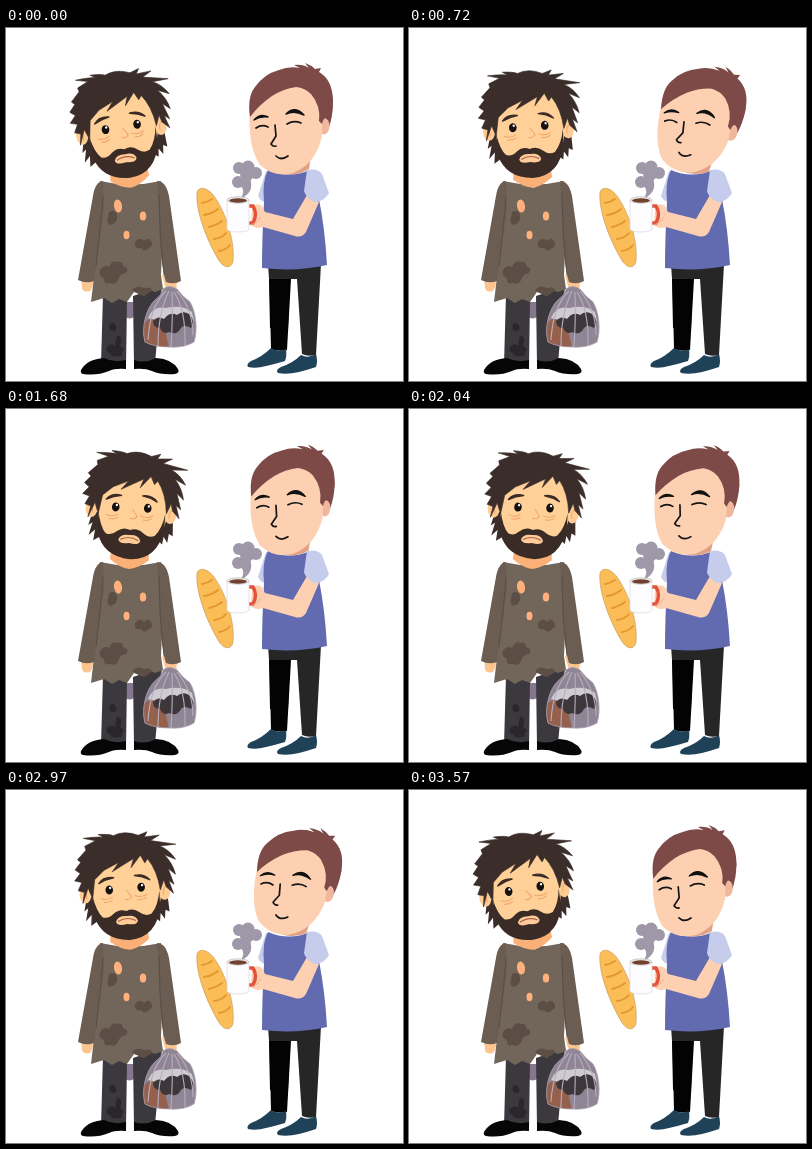
An HTML page that plays this animation: 397x353 px, repeating every 3.6 s.

```html
<!DOCTYPE html>
<html lang="en">
<head>
<meta charset="utf-8">
<title>Sharing breakfast</title>
<style>
html, body { margin: 0; width: 100%; height: 100%; overflow: hidden; background: #fff; }
svg { display: block; width: 397px; height: 353px; }
</style>
</head>
<body>
<svg viewBox="0 0 397 353" xmlns="http://www.w3.org/2000/svg">
  <defs>
    <path id="bagShape" d="M157 261Q163 256 171 261Q176 268 184 274C190 284 192 302 188 314Q178 320 164 319Q148 319 139 314C135 300 140 280 149 272Q156 267 157 261Z"/>
    <clipPath id="bagClip"><use href="#bagShape"/></clipPath>
  </defs>

  <!-- Ragged man: legs and shoes -->
  <path d="M119 274h10v14q-6 5-10 0z" fill="#85788e"/>
  <path d="M97 266L121 272L120 338Q109 340 95 336ZM127 268L156 258L149 335Q139 339 128 337Z" fill="#3b393d"/>
  <path d="M104 296q4-3 6 2t-3 5q-5-1-3-7M111 308q5-1 4 6t-6 2zM101 319q5-5 8-1q5-4 6 1q5 2 1 5q1 5-4 4q-7 2-8-3q-5-1-3-6" fill="#29272b"/>
  <path d="M75 342Q81 331 98 330Q108 335 120 332V341Q109 340 103 343Q91 348 77 346Q74 345 75 342ZM128 332Q139 336 150 330Q166 331 172 341Q174 345 169 346Q155 347 146 343Q139 340 128 341Z" fill="#060606"/>

  <!-- Hands and tunic -->
  <path d="M75 249h12q1 9-3 14q-7 2-8-3zM156 247h13q3 9 1 15q-8 2-11-4z" fill="#fcc58f"/>
  <path d="M94 153Q124 160 155 153L158 182L155 247L157 261L149 264L144 262L138 268L128 264L121 274L113 271L106 275L98 270L85 274L89 240L91 182Z" fill="#72665b"/>
  <path d="M97 153Q89 154 87 168L72 252Q80 256 88 253L98 181ZM151 153Q160 153 163 168L175 253Q168 257 160 254Q154 235 153 186Z" fill="#6b5d52"/>
  <path d="M97 168Q95 195 90 238M153 166Q153 207 158 247" fill="none" stroke="#594b42" stroke-width=".9"/>
  <path d="M103 184q7-3 8 4t-7 9q-4-3-2-7zM129 214q5-6 9-1q4-5 7 0q3 5-2 7q-5 5-8 0q-7 2-6-6M94 242q4-6 9-3q3-8 9-5q5-1 5 4q7 2 3 7q-6 1-7 5q-3 8-9 5q-7 2-6-5q-6-2-4-8M126 262q5-6 12-2q8-2 8 3l-8 5l-9-4z" fill="#5d4e45"/>
  <g fill="#ffb07c">
    <ellipse cx="112" cy="178" rx="4" ry="6.5" transform="rotate(-8 112 178)"/>
    <ellipse cx="137" cy="188" rx="3.2" ry="4.6"/>
    <ellipse cx="120.5" cy="207" rx="3" ry="4.2"/>
  </g>

  <!-- Bag -->
  <use href="#bagShape" fill="#8f8594"/>
  <g clip-path="url(#bagClip)">
    <path d="M137 296q9-9 20-3l6 27h-29z" fill="#95604c"/>
    <path d="M142 290Q147 277 160 280Q176 276 186 284L188 293Q170 288 158 294Z" fill="#cfcbd3"/>
    <path d="M147 293q5-6 11-2q6-8 13-4q6-5 12-1q7 7 2 14q-7-4-10 0q-4 8-12 4q-6 3-9-4q-7 0-7-7" fill="#3d373c"/>
    <path d="M160 263Q144 278 142 312M163 263Q152 285 152 318M166 264Q167 288 165 319M168 264Q180 282 179 317M171 263Q187 282 187 307" fill="none" stroke="#b8aebf" stroke-width="1.1"/>
  </g>
  <use href="#bagShape" fill="none" stroke="#a99fb0" stroke-width=".8"/>

  <!-- Baguette -->
  <path d="M191 164C194 157 203 161 208 168C221 186 229 215 227 233C226 240 219 241 214 234C203 217 189 184 191 164Z" fill="#fabd58" stroke="#c09355" stroke-width=".6"/>
  <path d="M196 175q6-1 10-4M198 187q8-1 14-6M203 199q8-2 13-6M208 211q8-1 12-6M213 223q7-1 11-6" fill="none" stroke="#e5972f" stroke-width="1.9" stroke-linecap="round"/>

  <!-- Young man: legs and shoes -->
  <path d="M263 236H292L285 251L281 322Q273 324 265 321Z" fill="#030303"/>
  <path d="M262 236H315L310 327Q302 329 296 326L291 251H263Z" fill="#262626"/>
  <path d="M263 251H284V252L282 300H264Z" fill="#030303"/>
  <path d="M265 320Q273 325 280 321Q281 328 279 333Q269 336 260 338Q250 341 242 339Q240 336 245 333Q256 329 265 320ZM295 327Q302 331 310 326Q312 333 310 339Q301 342 293 344Q281 347 272 345Q269 342 275 339Q287 335 295 327Z" fill="#1f4259"/>

  <!-- Shirt -->
  <path d="M260 143L252 168Q255 174 260 174L266 145Z" fill="#c6cdec"/>
  <path d="M262 142Q283 151 304 142Q310 150 313 171Q319 201 321 237Q290 244 256 240Q256 211 258 174Q256 153 262 142Z" fill="#626bb0"/>

  <!-- Steam, mug and arm -->
  <g fill="#9f98a8">
    <circle cx="233" cy="140" r="6"/>
    <circle cx="242" cy="139" r="6.500"/>
    <circle cx="250" cy="145" r="6"/>
    <circle cx="241" cy="146" r="7"/>
    <circle cx="232" cy="154" r="6"/>
    <circle cx="239" cy="154" r="6"/>
    <path d="M239 155h6Q247 165 234 171Q240 164 235 158Z"/>
  </g>
  <path d="M246 179Q251 174 256 178L259 184L287 191L301 167L313 174L300 204Q296 210 289 208L257 199Q250 202 245 197Z" fill="#fdd0b2"/>
  <path d="M243 178h4q5 8 0 17h-4" fill="none" stroke="#e5503a" stroke-width="3.400"/>
  <path d="M245 197Q252 195 255 189" fill="none" stroke="#eaa98c" stroke-width=".9"/>
  <path d="M221 172V201Q222 204 232 204T243 201V172Z" fill="#fdfdff" stroke="#d7d6df" stroke-width=".7"/>
  <ellipse cx="232" cy="172" rx="11" ry="3.200" fill="#f0eeee" stroke="#b8adb0" stroke-width=".6"/>
  <ellipse cx="232" cy="172.500" rx="9" ry="2.200" fill="#71412f"/>
  <path d="M301 142Q312 140 316 146L323 165Q318 174 308 174Q300 170 298 163Z" fill="#c6cdec"/>

  <!-- Young man's head -->
  <g id="young">
    <path d="M272 126L306 121L303 141Q287 151 267 143Z" fill="#e0a184"/>
    <path d="M306 50Q325 54 327 74Q327 88 323 99L313 104Z" fill="#7d4a48"/>
    <ellipse cx="318" cy="98" rx="5.500" ry="8.500" fill="#f1b79c"/>
    <path d="M244 78Q260 52 302 56L316 84V108Q310 136 287 145Q268 150 254 137Q241 118 244 78Z" fill="#fdd0b2"/>
    <path d="M244 89Q241 69 249 59Q258 46 273 42Q283 38 294 40L288 37Q297 36 303 40L299 35Q305 37 309 41L315 40L313 44Q327 52 327 74Q326 88 322 92Q318 87 316 96L313 93Q315 78 305 66Q299 60 290 59Q277 61 266 68Q253 77 244 89Z" fill="#7d4a48"/>
    <path d="M248 92Q254 85 262 89Q254 88 248 92ZM280 86Q289 77 298 87Q288 82 280 86Z" fill="#111" stroke="#111" stroke-width="1.4" stroke-linejoin="round"/>
    <path d="M250 100q6-4 12-1M281 96q7-4 14-1M269 97l1 11l-5 8q2 3 5 2M270 128q5 5 12 0" fill="none" stroke="#151515" stroke-width="1.7" stroke-linecap="round" stroke-linejoin="round"/>
  </g>

  <!-- Ragged man's head -->
  <g id="ragged">
    <path d="M105 139H142L143 150Q134 158 124 160Q114 159 104 151Z" fill="#fab077"/>
    <path d="M83 106L80 119L84 116L81 129L87 123L86 134L95 128L93 104ZM151 106L150 129L155 133L156 125L160 131L161 122L165 124L164 108Z" fill="#3b2d29"/>
    <ellipse cx="82" cy="102" rx="6" ry="9" fill="#ffcc93"/>
    <ellipse cx="161" cy="103" rx="6" ry="9" fill="#ffcc93"/>
    <path d="M80 98q4 3 3 9M163 98q-4 3-3 9" fill="none" stroke="#f0a86e" stroke-width="1"/>
    <path d="M88 80Q97 58 125 58Q151 61 157 82V110Q151 143 122 146Q96 140 89 108Z" fill="#ffd199"/>
    <path d="M89 104Q92 120 98 126Q104 128 109 123Q115 118 122 121Q129 118 135 123Q141 128 147 125Q154 117 156 102L156 118Q151 149 124 150Q97 149 90 126Z" fill="#3a2b26"/>
    <path d="M111 131Q113 125 122 126Q131 125 133 131Q132 136 122 134Q112 136 111 131Z" fill="#ffcb98"/>
    <path d="M113 131Q122 126 131 131" fill="none" stroke="#a5634b" stroke-width="1.2"/>
    <ellipse cx="106" cy="99" rx="3.800" ry="4.500" fill="#15110f"/>
    <ellipse cx="138" cy="98" rx="3.800" ry="4.500" fill="#15110f"/>
    <circle cx="107" cy="97" r="1.200" fill="#fff"/>
    <circle cx="139" cy="96" r="1.200" fill="#fff"/>
    <path d="M96 92Q101 85 111 87Q103 88 96 92ZM132 86Q141 84 147 91Q140 87 132 86Z" fill="#3a2b26" stroke="#3a2b26" stroke-width="1.4" stroke-linejoin="round"/>
    <path d="M123 100L128 107Q125 111 121 109M97 107q6 3 12-1M100 111q5 1 9-2M131 106q7 3 13-1M134 110q5 1 9-2" fill="none" stroke="#efa468" stroke-width="1"/>
    <path d="M79 111L81 100L75 98L79 90L72 88L78 81L73 77L79 70L76 67L85 58L84 54L95 49L83 46Q96 45 103 46L98 43Q109 43 113 45Q124 40 138 46L147 43L144 48L159 47L150 52L175 57L159 58Q168 62 174 72L163 67Q171 76 173 87L166 81L171 97L166 93L170 106L163 99L161 92L157 102Q155 82 146 70L143 74L139 66L129 78L132 69L110 81L117 72L102 79L92 88L89 107L85 96Z" fill="#3b2d29" stroke="#3b2d29" stroke-width=".6" stroke-linejoin="round"/>
  </g>
</svg>
<script>
const LOOP = 3600, STEP = 30;
const ragged = document.getElementById('ragged');
const young = document.getElementById('young');

// Linear swing: 0 -> 1 -> 0 over one period.
const swing = (t, period) => 1 - Math.abs(1 - 2 * (t % period) / period);
const turn = (part, angle, x, y) =>
  part.setAttribute('transform', `rotate(${angle.toFixed(3)} ${x} ${y})`);

function draw(time) {
  const t = Math.floor((time % LOOP) / STEP) * STEP;
  turn(ragged, -7.8 + 13 * swing(t, LOOP), 122, 148);
  turn(young, 14 * swing(t, LOOP / 2), 288, 126);
}

let start;
function tick(now) {
  start ??= now;
  draw(now - start);
  requestAnimationFrame(tick);
}
draw(0);
requestAnimationFrame(tick);
</script>
</body>
</html>
```
